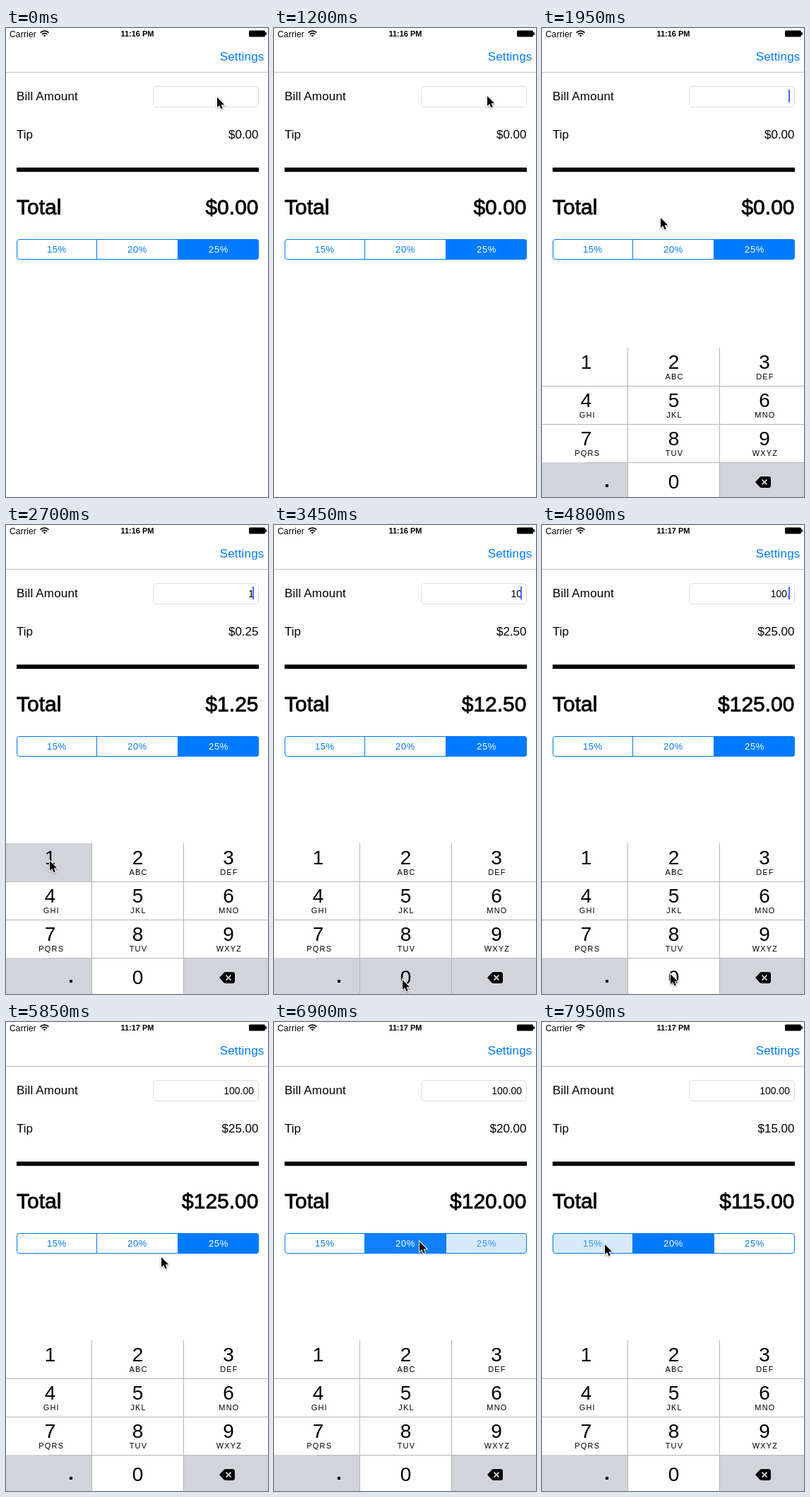
An HTML page for the animation above (8000 ms loop, 371x662 px).

```html
<!DOCTYPE html>
<html lang="en">
<head>
<meta charset="utf-8">
<title>Tip calculator</title>
<style>
html, body { margin: 0; width: 100%; height: 100%; overflow: hidden; background: #fefefe; }
svg { display: block; width: 371px; height: 662px; font: 17px "Liberation Sans", Arial, sans-serif; }
.mid { text-anchor: middle; }
.end { text-anchor: end; }
.blue { fill: #007aff; }
.small { font-size: 12px; letter-spacing: .2px; }
.clock { font-size: 11px; font-weight: bold; }
.big { font-size: 30px; stroke: #000; stroke-width: .8px; }
.field { font-size: 14px; }
.seg { font-size: 13px; letter-spacing: .6px; }
.digit { font-size: 28px; }
.abc { font-size: 11px; letter-spacing: 1.2px; }
#cursor { filter: drop-shadow(0 1px 1px rgba(0, 0, 0, .35)); }
</style>
</head>
<body>
<svg viewBox="0 0 371 662">
  <rect width="371" height="662" fill="#fefefe"/>
  <text class="small" x="5" y="13">Carrier</text>
  <g fill="none" stroke="#000" stroke-width="1.7">
    <path d="M48.6 6.6a8.3 8.3 0 0 1 11.8 0M50.8 9a5.2 5.2 0 0 1 7.4 0"/>
    <path d="M54.5 12.6l-2-2a2.9 2.9 0 0 1 4 0z" fill="#000" stroke="none"/>
  </g>
  <text id="clock" class="mid clock" x="186" y="12"></text>
  <rect x="344" y="3.5" width="23" height="9" rx="1.5"/>
  <rect x="367" y="6" width="2" height="4" rx="1"/>
  <text class="end blue" x="365.5" y="46" letter-spacing=".18">Settings</text>
  <rect y="62" width="371" height="1" fill="#c4c4c4"/>

  <text x="15" y="102" letter-spacing=".18">Bill Amount</text>
  <rect x="208.5" y="82.5" width="149" height="29" rx="4.5" fill="#fefefe" stroke="#dedede"/>
  <text id="bill" class="end field" x="351" y="102"></text>
  <rect id="caret" x="349" y="87" width="2" height="18" fill="#426bf2"/>
  <text x="15" y="156">Tip</text>
  <text id="tip" class="end" x="357.5" y="156"></text>
  <rect x="15" y="197" width="343" height="6"/>
  <text class="big" x="15" y="263">Total</text>
  <text id="total" class="end big" x="357.5" y="263"></text>

  <clipPath id="round"><rect x="15" y="298" width="343" height="29" rx="4"/></clipPath>
  <g id="segs" clip-path="url(#round)"></g>
  <path d="M128.5 298v29M243.5 298v29" stroke="#007aff"/>
  <rect x="15.5" y="298.5" width="342" height="28" rx="3.5" fill="none" stroke="#007aff"/>

  <g id="pad"></g>
  <path id="cursor" d="M0 0V14L3.2 11.1 5.5 16.2 7.8 15.2 5.6 10.2H10.2Z" stroke="#fff" stroke-width="2" paint-order="stroke"/>
</svg>
<script>
const LOOP = 8000, STEP = 150;
const $ = id => document.getElementById(id);
const GRAY = '#d1d4db', WHITE = '#fefefe';

// Segmented control
const rates = [15, 20, 25], segX = [15, 128, 243, 358];
$('segs').innerHTML = rates.map((r, i) =>
  `<rect id="seg${i}" x="${segX[i]}" y="298" width="${segX[i + 1] - segX[i]}" height="29" fill="#007aff"/>
   <text id="rate${i}" class="mid seg" x="${[71.8, 186, 301][i]}" y="317">${r}%</text>`).join('');

// Number pad
const colX = [0, 121, 251, 371], mid = [62.5, 186.5, 315];
const letters = ['', 'ABC', 'DEF', 'GHI', 'JKL', 'MNO', 'PQRS', 'TUV', 'WXYZ'];
const box = (id, x, y, w, fill) => `<rect id="${id}" x="${x}" y="${y}" width="${w}" height="54" fill="${fill}"/>`;
let pad = '';
letters.forEach((abc, i) => {
  const c = i % 3, y = 449 + 54 * Math.floor(i / 3);
  pad += box('key' + (i + 1), colX[c], y, colX[c + 1] - colX[c], WHITE) +
    `<text class="mid digit" x="${mid[c]}" y="${y + 30}">${i + 1}</text>
     <text class="mid abc" x="${mid[c] + (c ? 1 : 1.8)}" y="${y + 45}">${abc}</text>`;
});
pad += box('blank', 0, 611, 61, GRAY) + box('dot', 60, 611, 61, GRAY) +
  box('key0', 121, 611, 130, WHITE) + box('del', 251, 611, 120, GRAY) +
  `<rect x="90" y="642" width="4" height="4"/>
   <text class="mid digit" x="186.5" y="648">0</text>
   <path d="M302 639l6.5-7q1-1 2.5-1h10q3 0 3 3v10q0 3-3 3h-10q-1.500 0-2.500-1z"/>
   <path d="M311.500 635.500l7 7m0-7l-7 7" stroke="#fff" stroke-width="1.500"/>
   <path d="M0 503.500H371M0 557.500H371M60 611.500H371M121.500 449V662M251.500 449V662" stroke="#b4b5b8"/>`;
$('pad').innerHTML = pad;

// Time, x, y of the pointer tip
const path = [
  [0, 299, 98], [750, 299, 98], [1200, 302, 96], [1500, 302, 96], [1650, 290, 112],
  [1950, 168, 268], [2550, 62, 474], [2850, 62, 474], [3300, 182, 642], [4050, 182, 642],
  [4350, 92, 643], [4500, 92, 643], [4800, 182, 634], [5400, 182, 634], [5850, 220, 332],
  [6450, 206, 310], [6900, 206, 310], [7650, 89, 314], [8000, 89, 314]
];
const typed = [[0, ''], [2700, '1'], [3300, '10'], [3900, '100'], [4350, '100.'], [4950, '100.0'], [5250, '100.00']];
const presses = [['key1', 2700, 2850], ['key0', 3300, 3600], ['key0', 3900, 4050],
  ['dot', 4350, 4500], ['key0', 4950, 5100], ['key0', 5250, 5400]];
const caretOn = [[1650, 2100], [2400, 5700], [6000, 6450], [7050, 7800]];
const chosen = [[0, 25], [6900, 20], [7950, 15]];
// Fill strength of each segment
const fills = [[0, 0, 0, 1], [6750, 0, .15, 1], [6900, 0, .94, .15], [7050, 0, 1, 0], [7800, .15, 1, 0]];

const last = (list, t) => list.filter(e => e[0] <= t).pop();
const within = (t, a, b) => t >= a && t < b;
const money = v => '$' + v.toFixed(2);

function pointer(t) {
  const i = path.findIndex(p => p[0] > t), [a, x, y] = path[i - 1], [b, u, v] = path[i];
  const k = (t - a) / (b - a);
  return `translate(${Math.round(x + (u - x) * k)} ${Math.round(y + (v - y) * k)})`;
}

function draw(t) {
  const bill = last(typed, t)[1], tip = bill * last(chosen, t)[1] / 100;
  $('clock').textContent = t < 4350 ? '11:16 PM' : '11:17 PM';
  $('bill').textContent = bill;
  $('tip').textContent = money(tip);
  $('total').textContent = money(+bill + tip);
  $('caret').style.opacity = +caretOn.some(([a, b]) => within(t, a, b));

  last(fills, t).slice(1).forEach((f, i) => {
    $('seg' + i).style.opacity = f;
    $('rate' + i).style.fill = f > .5 ? '#fff' : f ? '#3095fb' : '#007aff';
  });

  const down = presses.find(([, a, b]) => within(t, a, b));
  for (const key of ['key0', 'key1', 'dot']) {
    const on = down && down[0] === key;
    $(key).style.fill = (key === 'dot') === !!on ? WHITE : GRAY;
  }

  // Keyboard rises on a critically damped spring
  const k = Math.max(0, t - 1600) * .019;
  const drop = Math.round(213 * (1 + k) * Math.exp(-k));
  $('pad').setAttribute('transform', `translate(0 ${drop})`);
  $('cursor').setAttribute('transform', pointer(t));
}

function tick() {
  const t = performance.now() % LOOP;
  draw(Math.floor(t / STEP) * STEP);
  requestAnimationFrame(tick);
}
tick();
</script>
</body>
</html>
```
